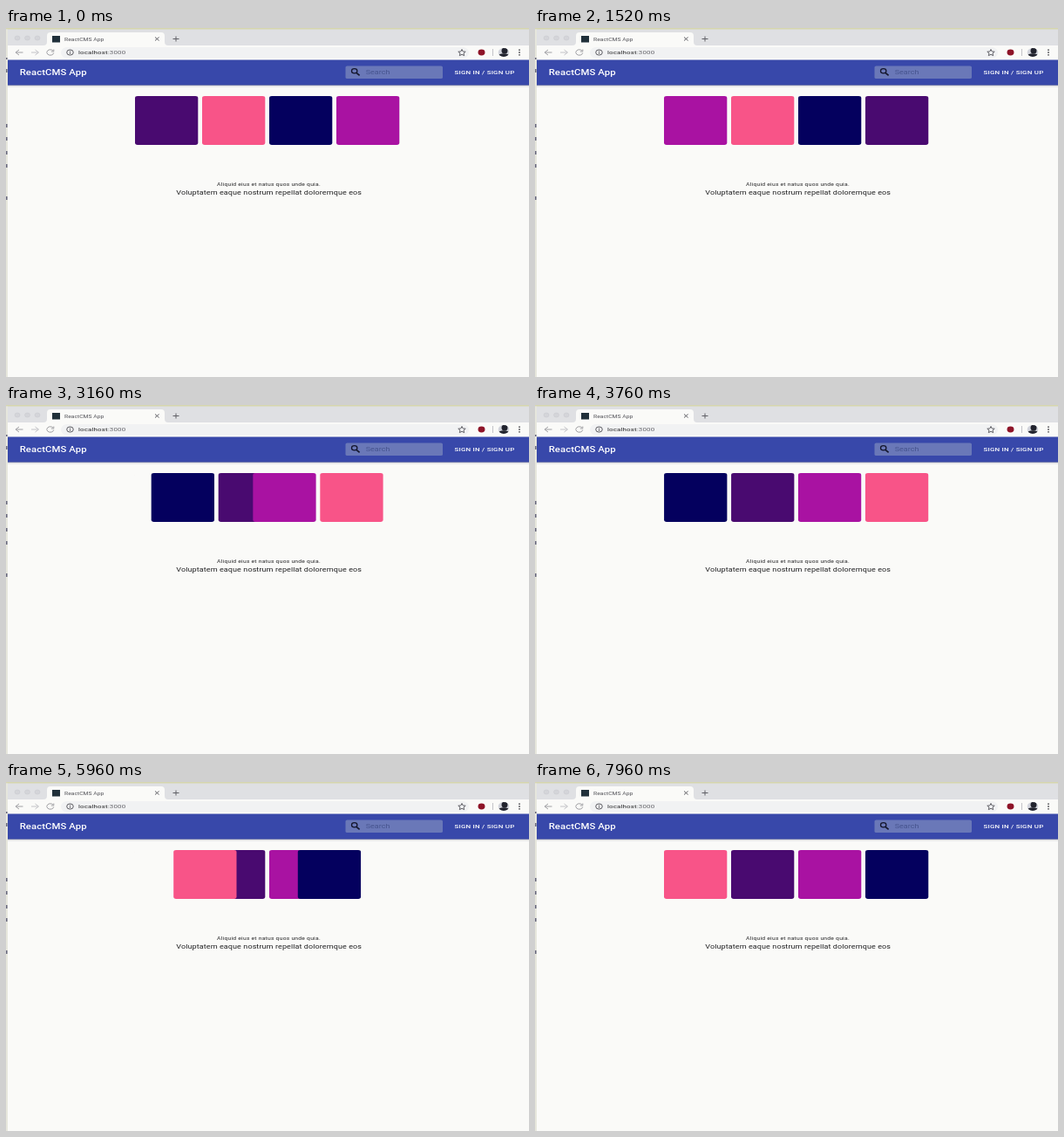
Write an HTML page that moves like this. It is 600 px wide and 400 px high and loops after 8000 ms.

```html
<!DOCTYPE html>
<html lang="en">
<head>
<meta charset="utf-8">
<title>ReactCMS App</title>
<style>
  html, body { margin: 0; width: 100%; height: 100%; overflow: hidden; background: #fafaf8; }
  svg { display: block; width: 600px; height: 400px; }
  text { font-family: Roboto, sans-serif; font-size: 16px; fill: #222224; }
  .line { fill: none; stroke: #606066; stroke-width: 1; }
  .soft { stroke: #a0a0a4; }
  .faint { stroke: #c4c4c8; }
</style>
</head>
<body>
<svg viewBox="0 0 600 400">
  <!-- browser chrome -->
  <rect width="600" height="400" fill="#fafaf8"/>
  <rect width="600" height="21" fill="#dfe0e3"/>
  <rect width="600" height="1.5" fill="#d6d6ae"/>
  <rect y="20" width="600" height="17" fill="#fafaf8"/>
  <g fill="#d4d5d9" stroke="#c6c7cc" stroke-width=".5">
    <ellipse cx="13" cy="11.5" rx="3" ry="2.5"/>
    <ellipse cx="24.5" cy="11.5" rx="3" ry="2.5"/>
    <ellipse cx="36" cy="11.5" rx="3" ry="2.5"/>
  </g>
  <path d="M43 20q4 0 4-4V9q0-4 4-4h127q4 0 4 4v7q0 4 4 4z" fill="#fafaf8"/>
  <rect x="53" y="9" width="9" height="7.5" fill="#20303a"/>
  <path class="line" d="M171 10.5l4.5 4M175.5 10.5l-4.5 4M191.5 12.5h7M195 9.5v6"/>
  <rect x="63" y="22" width="468" height="12.5" rx="7" ry="6" fill="#f1f2f3"/>
  <path class="line soft" d="M19.5 28h-8M15 25l-4 3 4 3"/>
  <path class="line faint" d="M29 28h8M33.5 25l4 3-4 3"/>
  <path class="line soft" d="M54 26a4 3.2 0 1 0 .8 2.5M54.8 24.5v2.5h-3"/>
  <ellipse class="line" cx="73.5" cy="28" rx="3.8" ry="3.1"/>
  <path class="line" d="M73.5 27.5v2.2M73.5 25.9v.8"/>
  <path class="line" d="M523 24.5l1.2 2.4 3 .3-2.2 1.9.7 2.6-2.7-1.4-2.7 1.4.7-2.6-2.2-1.9 3-.3z"/>
  <ellipse cx="545.5" cy="28" rx="4" ry="3.4" fill="#8e1428"/>
  <path class="line faint" d="M558.5 24v8"/>
  <clipPath id="avatar"><ellipse cx="571" cy="28" rx="6.3" ry="5"/></clipPath>
  <g clip-path="url(#avatar)">
    <rect x="564" y="22" width="14" height="12" fill="#d2d4dc"/>
    <ellipse cx="572" cy="26" rx="3.5" ry="3.5" fill="#22242e"/>
    <ellipse cx="571" cy="33" rx="7" ry="3.8" fill="#22242e"/>
  </g>
  <g fill="#505056">
    <circle cx="589" cy="25.2" r=".9"/><circle cx="589" cy="28" r=".9"/><circle cx="589" cy="30.8" r=".9"/>
  </g>

  <!-- app bar -->
  <rect x="2" y="65" width="598" height="1" fill="#a4a6ae"/>
  <rect x="2" y="66" width="598" height="1.5" fill="#e2e2e4"/>
  <rect x="2" y="36.5" width="598" height="29" fill="#3848aa"/>
  <rect x="389.5" y="43.5" width="111.5" height="14.5" rx="2" ry="1.6" fill="#6a78b8"/>
  <ellipse cx="399.7" cy="49.3" rx="3.2" ry="2.6" fill="none" stroke="#14162c" stroke-width="1.3"/>
  <path d="M402 51.3l3.6 3" stroke="#14162c" stroke-width="1.7"/>

  <!-- strip of the window behind -->
  <rect y="1.5" width="2" height="398.5" fill="#e6e6dc"/>
  <path d="M.8 34v2M.8 47v4M.8 110v4M.8 125v4M.8 141v4M.8 156v4M.8 193v4" stroke="#66667c" stroke-width="1.5"/>

  <g id="labels"></g>
  <g id="cards"></g>
</svg>
<script>
const SVG_NS = 'http://www.w3.org/2000/svg';
const LOOP = 8000;

function add(parent, tag, attributes, content = '') {
  const node = document.createElementNS(SVG_NS, tag);
  for (const [name, value] of Object.entries(attributes)) node.setAttribute(name, value);
  node.textContent = content;
  return parent.appendChild(node);
}

// The page is shown squeezed, by different amounts across and down.
function label(content, x, y, style) {
  return add(document.getElementById('labels'), 'text',
    { transform: `translate(${x} ${y}) scale(.566 .445)`, style }, content);
}

label('ReactCMS App', 67, 14.7, 'font-size:12px;fill:#505056');
const address = label('localhost', 83, 30.4, 'font-size:14px;letter-spacing:.02em');
add(address, 'tspan', { fill: '#606066' }, ':3000');
label('ReactCMS App', 15.7, 53.8, 'font-size:20px;font-weight:500;letter-spacing:.0075em;fill:#fff');
label('Search', 412.7, 53.2, 'fill:#46548e');
label('SIGN IN / SIGN UP', 514.5, 53,
  'font-size:14px;font-weight:500;letter-spacing:.02857em;fill:#fff');
label('Aliquid eius et natus quos unde quia.', 242, 181.3, 'font-size:12px;letter-spacing:.03333em');
label('Voluptatem eaque nostrum repellat doloremque eos', 195.3, 191.2, 'letter-spacing:.00938em');

const colors = { plum: '#490a70', coral: '#f85488', navy: '#04005e', magenta: '#a912a2' };
const cardLayer = document.getElementById('cards');
const cards = {};
for (const [name, fill] of Object.entries(colors)) {
  cards[name] = add(cardLayer, 'rect', { y: 78, width: 72.3, height: 56, rx: 3, ry: 2.4, fill });
}

const shuffles = [
  { at: -LOOP, order: ['plum', 'coral', 'navy', 'magenta'] },
  { at: 20, order: ['magenta', 'coral', 'navy', 'plum'] },
  { at: 2849, order: ['navy', 'plum', 'magenta', 'coral'] },
  { at: 5674, order: ['coral', 'plum', 'magenta', 'navy'] }
];
const slotX = slot => 148 + 77 * slot;

// Remaining share of the distance for a spring with damping ratio 0.5, at rest after 1.4 s.
function springOffset(seconds) {
  if (seconds > 1.4) return 0;
  const angle = 5.75 * seconds, decay = 1 / Math.sqrt(3);
  return Math.exp(-decay * angle) * (Math.cos(angle) + decay * Math.sin(angle));
}

let shownStep = -1;

function render(time) {
  const step = shuffles.findLastIndex(shuffle => time >= shuffle.at);
  const { at, order } = shuffles[step];
  const previous = shuffles[Math.max(step - 1, 0)].order;
  const offset = springOffset((time - at) / 1000);

  order.forEach((name, slot) => {
    const x = slotX(slot), from = slotX(previous.indexOf(name));
    cards[name].setAttribute('x', x + (from - x) * offset);
  });

  if (step !== shownStep) {
    // Moving cards lie above the resting ones.
    const moves = name => previous.indexOf(name) !== order.indexOf(name);
    const stacked = [...order.filter(name => !moves(name)), ...order.filter(moves)];
    cardLayer.append(...stacked.map(name => cards[name]));
    shownStep = step;
  }
}

const start = performance.now();
function tick() {
  render((performance.now() - start) % LOOP);
  requestAnimationFrame(tick);
}
tick();
</script>
</body>
</html>
```
